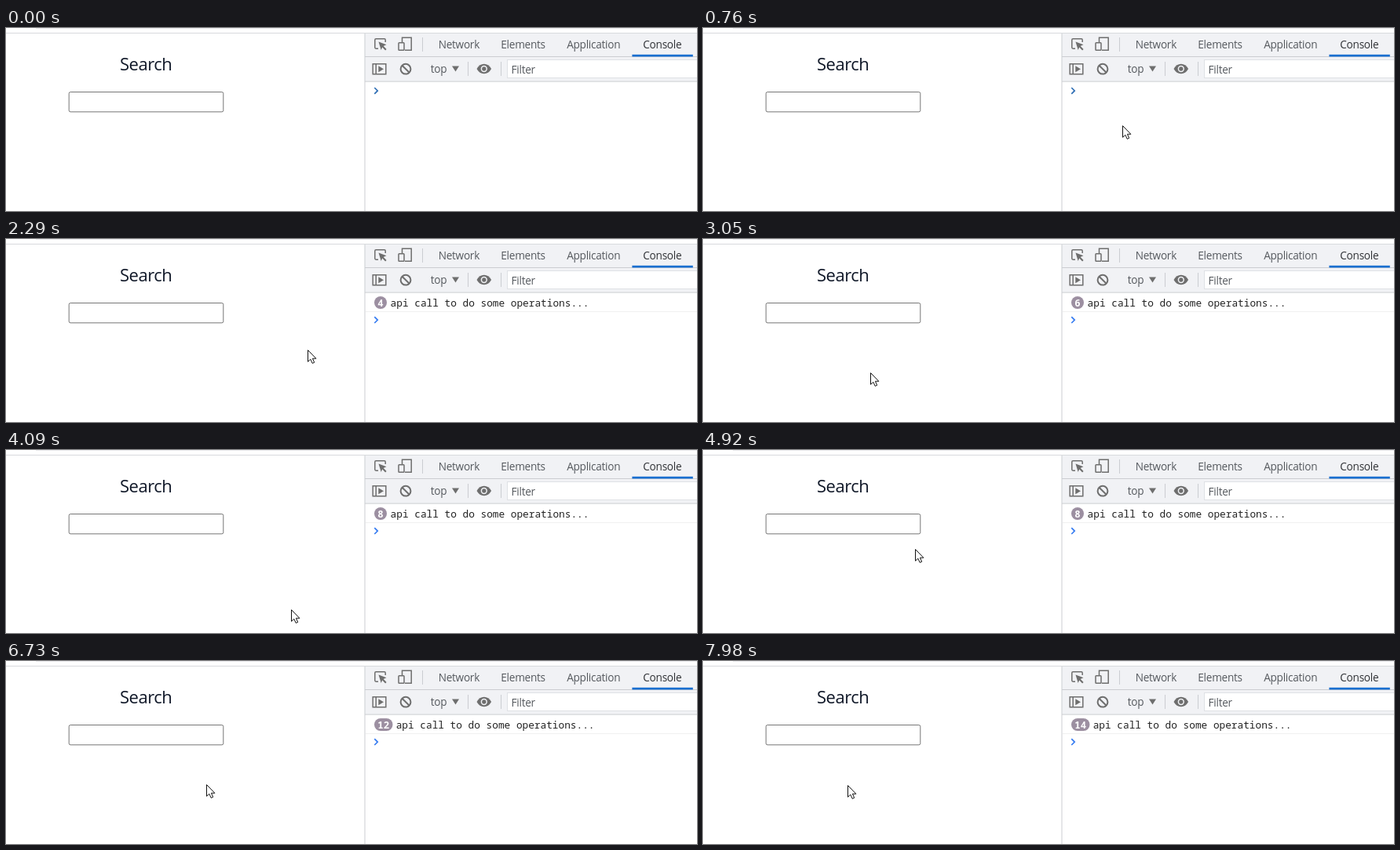
An HTML page that plays this animation: 880 px wide and 233 px high, repeating every 8000 ms.

```html
<!DOCTYPE html>
<html lang="en">
<head>
<meta charset="utf-8">
<title>Throttled search</title>
<style>
  html, body { margin: 0; width: 100%; height: 100%; overflow: hidden; background: #fff; }
  svg { display: block; width: 880px; height: 233px; }
  text { font-family: "Open Sans", "Noto Sans", sans-serif; font-size: 13.6px; letter-spacing: -.26px; fill: #55595e; }
  .title { font-size: 22px; letter-spacing: -.5px; fill: #101828; }
  .active { fill: #303236; }
  .mono, .badge { font-family: "Noto Sans Mono", "DejaVu Sans Mono", monospace; letter-spacing: 0; }
  .mono { font-size: 12.77px; fill: #222; }
  .badge { font-size: 12.4px; font-weight: 600; fill: #fff; text-anchor: middle; }
  .icon { fill: none; stroke: #6e6e6e; stroke-width: 1.5; }
  .solid { fill: #6e6e6e; }
  .rule { fill: #cbcdd1; }
</style>
</head>
<body>
<svg viewBox="0 0 880 233">
  <rect width="880" height="233" fill="#fff"/>
  <rect x="38" width="842" height="1" fill="#e9eaec"/>
  <rect y="6" width="880" height="1" fill="#d8dadd"/>

  <text class="title" x="145" y="53.5">Search</text>
  <rect x="80.2" y="81.5" width="196.6" height="25.3" rx="2" fill="#fff" stroke="#767676"/>

  <rect x="457" y="7" width="423" height="61" fill="#f1f2f5"/>
  <rect class="rule" x="457" y="36" width="423" height="1"/>
  <rect class="rule" x="457" y="67.6" width="423" height="1"/>
  <rect class="rule" x="456.5" y="7" width="1" height="226"/>
  <rect class="rule" x="530" y="12" width="1" height="18"/>
  <rect class="rule" x="588" y="43" width="1" height="18"/>
  <rect class="rule" x="630" y="43" width="1" height="18"/>

  <path class="icon" d="M474 26.2H471.2Q469.8 26.2 469.8 24.8V15.2Q469.8 13.8 471.2 13.8H481.8Q483.2 13.8 483.2 15.2V18"/>
  <path class="solid" d="M474.5 17.5L484.5 21.3L480.7 23L484.6 26.9L483.1 28.4L479.2 24.5L477.7 28Z"/>
  <path class="icon" d="M504.5 18V12.2H516.2V28.2H508"/>
  <rect class="icon" x="500" y="18.7" width="7" height="9.5" rx=".8"/>

  <text x="550.7" y="25.6">Network</text>
  <text x="630.3" y="25.6">Elements</text>
  <text x="714.2" y="25.6">Application</text>
  <text class="active" x="811.3" y="25.6">Console</text>
  <rect x="797.4" y="33.8" width="77.4" height="2.7" fill="#1a6fd0"/>

  <path class="icon" d="M467.2 45.7H483.8V58.8H467.2ZM471.2 45.7V58.8"/>
  <path class="solid" d="M474.3 48.3L481 52.2L474.3 56.2Z"/>
  <g class="icon" style="stroke-width:2">
    <circle cx="509" cy="52.2" r="6.4"/>
    <path d="M504.5 47.7L513.5 56.7"/>
  </g>
  <text x="540.8" y="57">top</text>
  <path class="solid" d="M568 48.5H577L572.5 55.6Z"/>
  <path class="solid" d="M599.5 52Q603 45.8 608.8 45.8T618.1 52Q614.6 58.2 608.8 58.2T599.5 52Z"/>
  <circle cx="608.8" cy="52" r="3.4" fill="#6e6e6e" stroke="#f1f2f5" stroke-width="1.5"/>
  <rect x="638.5" y="40.5" width="250" height="23" fill="#fff" stroke="#dfe1e5"/>
  <text x="643.6" y="57.5">Filter</text>

  <g id="log" visibility="hidden">
    <rect id="pill" x="469" y="73" width="16" height="16" rx="8" fill="#9c8fa1"/>
    <text id="count" class="badge" y="85.8"></text>
    <text id="message" class="mono" y="86">api call to do some operations...</text>
    <rect x="458" y="92" width="422" height="1" fill="#f0f0f0"/>
  </g>
  <path id="prompt" d="M0 0L3.9 3.9L0 7.8" fill="none" stroke-width="1.7"/>
  <path id="cursor" visibility="hidden" d="M-.5 -.5V14.2L2.8 11.1L5.2 16.3L7.7 15.2L5.4 10.2H9.9Z" fill="#fff" stroke="#111" stroke-linejoin="round"/>
</svg>
<script>
  const LOOP = 8000, START = 420, STEP = 69.35, THROTTLE = 1040;

  // Main turns of the pointer: time, x, y
  const turns = [
    [START, 741, 195], [900, 456, 109], [1390, 326, 167], [1660, 264, 146],
    [2360, 388, 142], [3050, 214, 171], [3330, 219, 201], [4090, 364, 204],
    [4600, 335, 106], [5060, 235, 152], [5410, 275, 188], [5950, 398, 148],
    [6450, 214, 168], [7140, 330, 140], [LOOP, 185, 159]
  ];

  const el = id => document.getElementById(id);
  const [log, pill, count, message, prompt, cursor] =
    ["log", "pill", "count", "message", "prompt", "cursor"].map(el);
  const set = (node, attrs) => {
    for (const name in attrs) node.setAttribute(name, attrs[name]);
  };

  // Tangent at a turn; zero where the motion reverses
  function slope(i, axis) {
    const a = turns[i - 1], b = turns[i], c = turns[i + 1];
    if (!a || !c) return 0;
    const before = (b[axis] - a[axis]) / (b[0] - a[0]);
    const after = (c[axis] - b[axis]) / (c[0] - b[0]);
    return before * after <= 0 ? 0 : 2 * before * after / (before + after);
  }

  // Smooth Hermite curve through the turns
  function along(t, axis) {
    const i = turns.findIndex(turn => turn[0] > t) - 1;
    const a = turns[i], b = turns[i + 1], span = b[0] - a[0];
    const u = (t - a[0]) / span, v = 1 - u;
    return a[axis] * v * v * (1 + 2 * u) + b[axis] * u * u * (3 - 2 * u)
      + span * u * v * (slope(i, axis) * v - slope(i + 1, axis) * u);
  }

  function draw(t) {
    const shown = t >= START;
    set(cursor, { visibility: shown ? "visible" : "hidden" });
    if (shown) {
      const tick = START + Math.floor((t - START + 6) / STEP) * STEP;
      const x = Math.round(along(tick, 1)), y = Math.round(along(tick, 2));
      set(cursor, { transform: `translate(${x} ${y})` });
    }

    // Each throttled call logs twice
    const calls = 2 * Math.floor((t + 70) / THROTTLE);
    const wide = calls > 9;
    set(log, { visibility: calls ? "visible" : "hidden" });
    set(pill, { width: wide ? 23.5 : 16 });
    set(count, { x: wide ? 480.7 : 477 });
    set(message, { x: wide ? 496.7 : 489.6 });
    count.textContent = calls;
    set(prompt, {
      transform: `translate(469.3 ${calls ? 99.2 : 76})`,
      stroke: calls ? "#367cf1" : "#2f6fb5"
    });
  }

  const frame = () => {
    draw(performance.now() % LOOP);
    requestAnimationFrame(frame);
  };
  frame();
</script>
</body>
</html>
```
